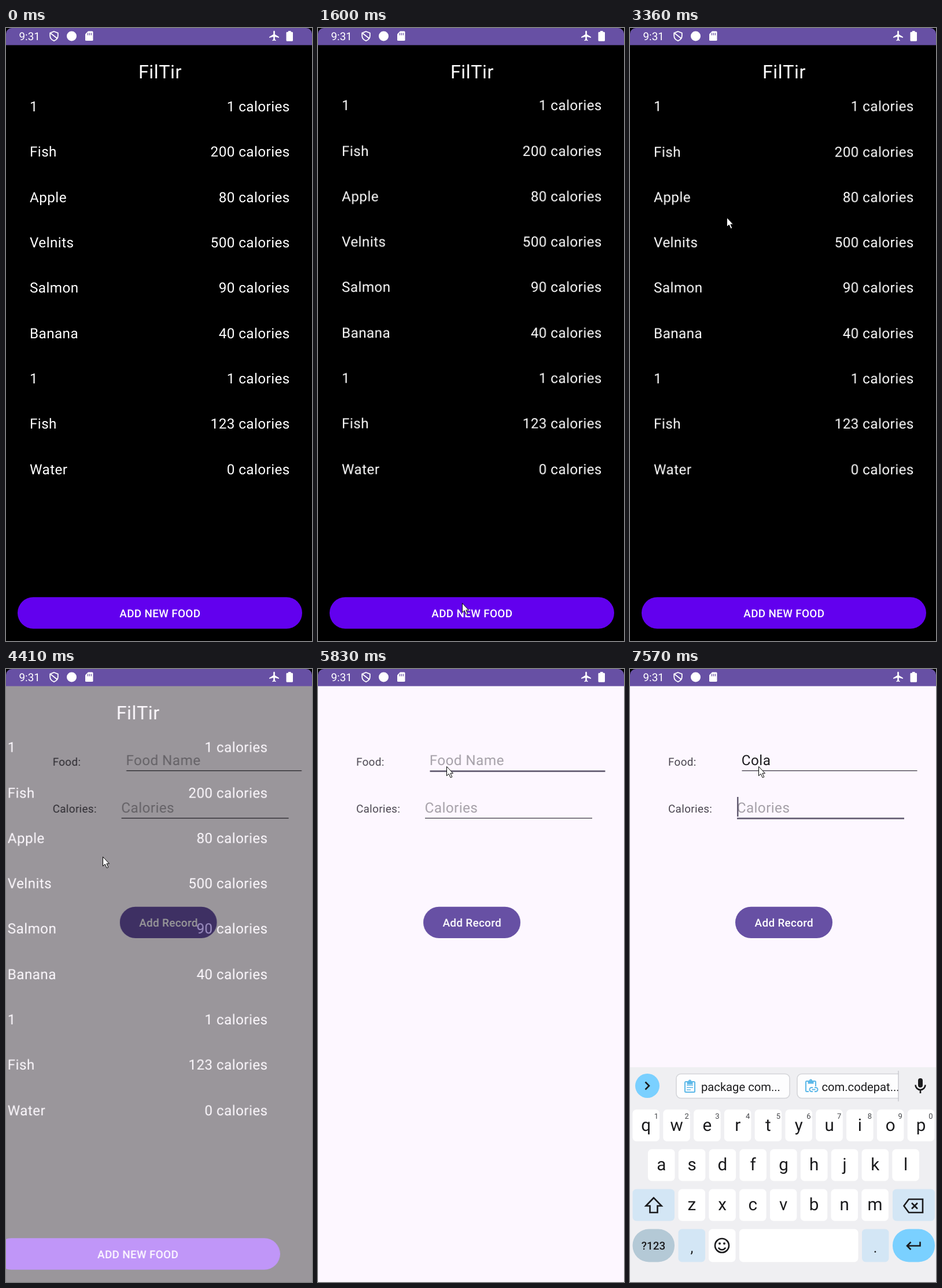
Animation, 529 px wide and 1059 px high, one loop 8 s. Source, as an HTML page:

```html
<!DOCTYPE html>
<html lang="en">
<head>
<meta charset="utf-8">
<title>Food log</title>
<style>
html, body { margin: 0; width: 100%; height: 100%; overflow: hidden; background: #000; }
svg { display: block; width: 529px; height: 1059px; font-family: Roboto, "Open Sans", sans-serif; }
text { white-space: pre; text-rendering: geometricPrecision; }
.title { font-size: 32.33px; letter-spacing: .0179em; }
.big { font-size: 24.25px; letter-spacing: .0179em; }
.label { font-size: 18.86px; letter-spacing: .0179em; fill: #49454f; }
.medium { font-size: 18.86px; font-weight: 500; }
.spaced { letter-spacing: .0179em; }
.hint { fill: #a5a0a8; }
.mid { text-anchor: middle; }
.end { text-anchor: end; }
.glyph { font-size: 29.6px; fill: #1b1b1d; text-anchor: middle; }
.line { fill: none; stroke: #1b1b1d; stroke-width: 2.6; }
.accent { fill: #625b71; }

/* every track shares one 8 s clock */
#list, #main, #entry, #shift, #cursor, #press, #tint, #ripple, #board,
#hint, #caret, #caret2, .step, .on1, .off1, .on2, .off2 {
  animation: 8s linear infinite;
}
#list { animation-name: stretch; transform-origin: 0 970px; }
#main { animation-name: slideOut; }
#entry { animation-name: fadeIn; }
#shift { animation-name: slideIn; }
#cursor { animation-name: move; }
#press { animation-name: press; animation-timing-function: step-end; }
#tint { animation-name: tint; }
#ripple { animation-name: ripple; transform-origin: 245px 1011px; }
#board { animation-name: rise; }
#caret { animation-name: caret; animation-timing-function: step-end; }
#hint { animation-name: hideHint; animation-timing-function: step-end; }
.step, .on1, .off1, .on2, .off2 { animation-timing-function: step-end; }
.c { animation-name: typeC; }
.ol { animation-name: typeOl; }
.a { animation-name: typeA; }
.on1 { animation-name: foodFocus; }
.off1 { animation-name: foodBlur; }
.on2, #caret2 { animation-name: calFocus; animation-timing-function: step-end; }
.off2 { animation-name: calBlur; }

@keyframes stretch {
  0%, 4.75% { transform: scaleY(1); animation-timing-function: ease-out; }
  7.75%, 9.25% { transform: scaleY(1.0235); animation-timing-function: cubic-bezier(.2, .6, .3, 1); }
  12.5%, 13.5% { transform: scaleY(1); }
  14.125%, 15% { transform: scaleY(1.0045); }
  16.625%, 17.5% { transform: scaleY(1.0245); animation-timing-function: cubic-bezier(.2, .6, .3, 1); }
  22%, 100% { transform: scaleY(1); }
}
@keyframes slideOut {
  0%, 53.8625% { transform: translateX(0); animation-timing-function: cubic-bezier(.3, 0, .8, .15); }
  54.8% { transform: translateX(-21.2px); animation-timing-function: cubic-bezier(.05, .7, .1, 1); }
  59.4875%, 100% { transform: translateX(-52.9px); }
}
@keyframes slideIn {
  0%, 53.8625% { transform: translateX(52.9px); animation-timing-function: cubic-bezier(.3, 0, .8, .15); }
  54.8% { transform: translateX(31.7px); animation-timing-function: cubic-bezier(.05, .7, .1, 1); }
  59.4875%, 100% { transform: translateX(0); }
}
@keyframes fadeIn { 0%, 54.505% { opacity: 0; } 55.545%, 100% { opacity: 1; } }
@keyframes move {
  0%, 1.49% { transform: translate(434px, 1002px); opacity: 0; }
  1.5% { transform: translate(434px, 1002px); opacity: 1; }
  3.75% { transform: translate(350px, 800px); }
  4.75% { transform: translate(330px, 770px); animation-timing-function: ease-out; }
  7.75% { transform: translate(322px, 610px); }
  9.25% { transform: translate(322px, 606px); animation-timing-function: ease-in-out; }
  13.25%, 13.5% { transform: translate(322px, 752px); }
  14.125%, 15% { transform: translate(322.5px, 717.5px); }
  16.625%, 17.5% { transform: translate(318px, 590px); animation-timing-function: ease-in-out; }
  20.5%, 22.5% { transform: translate(245px, 1016px); animation-timing-function: ease-in; }
  24.875% { transform: translate(232px, 864px); }
  25.875%, 26.5% { transform: translate(183.5px, 702px); }
  28.125% { transform: translate(165px, 537px); }
  29.375% { transform: translate(168px, 492px); }
  30.625% { transform: translate(176px, 452px); }
  31.75% { transform: translate(182px, 424px); }
  34.25%, 36% { transform: translate(177px, 368px); }
  42%, 54.3% { transform: translate(167px, 327px); }
  55%, 60% { transform: translate(167px, 324px); animation-timing-function: ease-in-out; }
  63.625% { transform: translate(212px, 176px); }
  66.25%, 100% { transform: translate(222px, 168px); opacity: 1; }
}
@keyframes press {
  0% { opacity: 0; } 4.75% { opacity: 1; } 9.25% { opacity: 0; }
  13.5% { opacity: 1; } 17.5% { opacity: 0; }
  21.625% { opacity: 1; } 22.5% { opacity: 0; } 65.8% { opacity: 1; } 66.8%, 100% { opacity: 0; }
}
@keyframes tint {
  0%, 21.625% { opacity: 0; } 23%, 31.5% { opacity: 1; } 34.25%, 100% { opacity: 0; }
}
@keyframes ripple {
  0%, 21.625% { transform: scale(0); animation-timing-function: ease-out; }
  27.5%, 100% { transform: scale(1); }
}
@keyframes rise {
  0%, 83.5% { transform: translateY(372px); animation-timing-function: cubic-bezier(.2, .2, .1, 1); }
  87.5%, 100% { transform: translateY(0); }
}
@keyframes caret {
  0% { opacity: 0; transform: translateX(0); }
  66.625% { opacity: 1; }
  72.875% { opacity: 0; }
  80.25% { opacity: 1; transform: translateX(0); }
  82.875% { opacity: 1; transform: translateX(16.5px); }
  90.375% { opacity: 1; transform: translateX(37px); }
  93% { opacity: 1; transform: translateX(50.5px); }
  94.625%, 100% { opacity: 0; transform: translateX(50.5px); }
}
@keyframes hideHint { 0% { visibility: visible; } 82.875%, 100% { visibility: hidden; } }
@keyframes typeC { 0% { visibility: hidden; } 82.875%, 100% { visibility: visible; } }
@keyframes typeOl { 0% { visibility: hidden; } 90.375%, 100% { visibility: visible; } }
@keyframes typeA { 0% { visibility: hidden; } 93%, 100% { visibility: visible; } }
@keyframes foodFocus { 0% { opacity: 0; } 66.625% { opacity: 1; } 94.625%, 100% { opacity: 0; } }
@keyframes foodBlur { 0% { opacity: 1; } 66.625% { opacity: 0; } 94.625%, 100% { opacity: 1; } }
@keyframes calFocus { 0% { opacity: 0; } 94.625%, 100% { opacity: 1; } }
@keyframes calBlur { 0% { opacity: 1; } 94.625%, 100% { opacity: 0; } }
</style>
</head>
<body>
<svg viewBox="0 0 529 1059" xmlns="http://www.w3.org/2000/svg">
  <defs>
    <clipPath id="pill"><rect x="20" y="983.3" width="492" height="54.5" rx="27.2"/></clipPath>
    <clipPath id="strip"><rect x="0" y="688" width="464" height="70"/></clipPath>
    <g id="clip" fill="none" stroke="#5cb8e8" stroke-width="2">
      <rect x="1" y="3" width="17" height="18" rx="1.5"/>
      <path d="M5.5 3v3.5h8v-3.5" fill="#5cb8e8"/>
      <circle cx="9.5" cy="2.2" r="1.6"/>
    </g>
  </defs>
  <rect width="529" height="1059"/>

  <g id="main" fill="#fff">
    <text class="title mid" x="266.5" y="87">FilTir</text>
    <g id="list" class="big"></g>
    <rect x="20" y="983.3" width="492" height="54.5" rx="27.2" fill="#6200ee"/>
    <g id="tint" clip-path="url(#pill)">
      <rect x="20" y="983" width="492" height="55" opacity=".05"/>
      <circle id="ripple" cx="245" cy="1011" r="275" opacity=".06"/>
    </g>
    <text class="medium spaced mid" x="266.3" y="1018">ADD NEW FOOD</text>
  </g>

  <g id="entry">
    <rect width="529" height="1059" fill="#fdf7ff"/>
    <g id="shift">
      <text class="label" x="66" y="167">Food:</text>
      <text class="label" x="66" y="248">Calories:</text>
      <text id="hint" class="big hint" x="192.8" y="165.5">Food Name</text>
      <text class="big hint" x="184.7" y="247.5">Calories</text>
      <text class="big" x="192.8" y="165.5" fill="#1c1b1f"><tspan class="step c">C</tspan><tspan class="step ol">ol</tspan><tspan class="step a">a</tspan></text>
      <rect class="off1" x="193.5" y="175" width="303" height="1.35" fill="#49454f"/>
      <rect class="on1 accent" x="193.5" y="175.2" width="303" height="2.7"/>
      <rect class="off2" x="185" y="257" width="289" height="1.35" fill="#49454f"/>
      <rect class="on2 accent" x="185" y="256.8" width="289" height="2.7"/>
      <rect id="caret" class="accent" x="193.5" y="139" width="2.5" height="33"/>
      <rect id="caret2" class="accent" x="185" y="221" width="2.5" height="34"/>
      <rect x="182" y="410.7" width="168" height="54.3" rx="27.1" fill="#6750a4"/>
      <text class="medium spaced mid" x="266.3" y="445" fill="#fff">Add Record</text>
    </g>
  </g>

  <g id="board">
    <rect y="688" width="529" height="372" fill="#efeff2"/>
    <circle cx="30" cy="720" r="21" fill="#7ad0ff"/>
    <path class="line" d="M26.5 713.5l6.5 6.5-6.5 6.5"/>
    <g clip-path="url(#strip)" font-size="20.2" fill="#1b1b1d">
      <g fill="#fdfdfe" stroke="#d3d4d8" stroke-width="1.5">
        <rect x="80" y="699.5" width="196" height="42" rx="8"/>
        <rect x="289" y="699.5" width="196" height="42" rx="8"/>
      </g>
      <use href="#clip" x="94" y="710"/>
      <path d="M98 719h11M98 723h11M98 727h7" stroke="#5cb8e8" stroke-width="1.7"/>
      <use href="#clip" x="303" y="709"/>
      <rect x="309" y="721" width="17" height="12" fill="#fdfdfe"/>
      <path d="M316 723h-2a3.5 3.5 0 0 0 0 7h2M319 723h2a3.5 3.5 0 0 1 0 7h-2M314.5 726.5h6" fill="none" stroke="#5cb8e8" stroke-width="2"/>
      <text x="123" y="728.5">package com...</text>
      <text x="331.5" y="728.5">com.codepat...</text>
    </g>
    <path d="M464 694v53" stroke="#c4c5c9" stroke-width="1.3"/>
    <rect x="498" y="707" width="8" height="16" rx="4" fill="#1b1b1d"/>
    <path class="line" d="M493.5 718.5a8.5 8.5 0 0 0 17 0M502 727v6"/>
    <g id="keys"></g>
    <path class="line" d="M41 913.5l-13.5 14h7v11.5h13v-11.5h7z"/>
    <path class="line" d="M482 916h24v23h-24l-8.5-11.5zM487 922.5l10 10m0-10l-10 10"/>
    <circle class="line" cx="159" cy="996" r="12"/>
    <path class="line" d="M153 999.5a6.5 6 0 0 0 12 0"/>
    <circle cx="155" cy="992.5" r="2" fill="#1b1b1d"/>
    <circle cx="163" cy="992.5" r="2" fill="#1b1b1d"/>
    <path class="line" d="M501.5 989.5v7h-22M485.5 990l-6.5 6.5 6.5 6.5"/>
    <text class="medium mid" x="40.5" y="1003" fill="#1b1b1d">?123</text>
    <g class="mid" font-size="25" fill="#1b1b1d">
      <text x="107" y="1008">,</text>
      <text x="424" y="1008">.</text>
    </g>
  </g>

  <g fill="#fff">
    <rect width="529" height="29.6" fill="#6750a4"/>
    <path d="M0 0h10a10 10 0 0 0-10 10zM529 0h-10a10 10 0 0 1 10 10z" fill="#000"/>
    <text x="22.5" y="21" font-size="18.86">9:31</text>
    <path d="M83 6l6.8 2.6v5q0 6-6.8 8.6-6.8-2.6-6.8-8.6v-5zM77 9l11.5 9" fill="none" stroke="#fff" stroke-width="1.8"/>
    <circle cx="113.5" cy="14" r="8.5"/>
    <path d="M142 5.5h7q1.5 0 1.5 1.5v13.5q0 1.5-1.5 1.5h-10.5q-1.5 0-1.5-1.5v-10z"/>
    <path d="M141.5 8.5v4M144.5 8.5v4M147.5 8.5v4" stroke="#6750a4" stroke-width="1.3"/>
    <path transform="translate(453.4 3) scale(.88)" d="M21 16v-2l-8-5V3.5c0-.83-.67-1.5-1.5-1.5S10 2.67 10 3.5V9l-8 5v2l8-2.5V19l-2 1.5V22l3.5-1 3.5 1v-1.5L13 19v-5.5z"/>
    <path d="M488 5h4.5v1.8h2q1.5 0 1.5 1.5v13q0 1.5-1.5 1.5h-8.5q-1.5 0-1.5-1.5v-13q0-1.5 1.5-1.5h2z"/>
  </g>

  <g id="cursor">
    <circle id="press" cx=".8" cy="1.5" r="11" fill="#fff400" fill-opacity=".5"/>
    <path d="M.5.5v16l3.7-3.4 3 6.6 2.6-1.2-2.9-6.3h4.6z" fill="#fff" stroke="#000"/>
  </g>
</svg>
<script>
const NS = 'http://www.w3.org/2000/svg';

function add(parent, tag, attrs, label) {
  const el = document.createElementNS(NS, tag);
  for (const name in attrs) el.setAttribute(name, attrs[name]);
  if (label !== undefined) el.textContent = label;
  parent.append(el);
}

const foods = [
  ['1', 1], ['Fish', 200], ['Apple', 80], ['Velnits', 500], ['Salmon', 90],
  ['Banana', 40], ['1', 1], ['Fish', 123], ['Water', 0]
];
const list = document.getElementById('list');
foods.forEach(([name, amount], i) => {
  const y = 143.8 + 78.35 * i;
  add(list, 'text', { x: 41, y }, name);
  add(list, 'text', { x: 490.8, y, class: 'end' }, amount + ' calories');
});

const keys = document.getElementById('keys');
function key(x, y, width, fill = '#fff', rx = 6.5, height = 55) {
  add(keys, 'rect', { x, y, width, height, rx, fill });
}
function letters(row, left, top) {
  [...row].forEach((ch, i) => {
    const x = left + 52.8 * i;
    key(x, top, 46.5);
    add(keys, 'text', { x: x + 23.25, y: top + 36.5, class: 'glyph' }, ch);
  });
}
letters('qwertyuiop', 4.5, 761);
letters('asdfghjkl', 31, 829.5);
letters('zxcvbnm', 83.5, 898.5);
[...'1234567890'].forEach((n, i) =>
  add(keys, 'text', { x: 45.5 + 52.7 * i, y: 776.5, class: 'mid', 'font-size': 13, fill: '#44464a' }, n));

const pale = '#d3e6f5';
key(4.5, 898.5, 72.5, pale);
key(454, 898.5, 73, pale);
key(4.5, 967.5, 72.5, '#b4c9d6', 28, 57);
key(83.5, 967.5, 46.5, pale, 6.5, 57);
key(136, 967.5, 46.5, '#fff', 6.5, 57);
key(189, 967.5, 205.5, '#fff', 6.5, 57);
key(401, 967.5, 46.5, pale, 6.5, 57);
key(454, 967.5, 73, '#7ad0ff', 28, 57);
</script>
</body>
</html>
```
